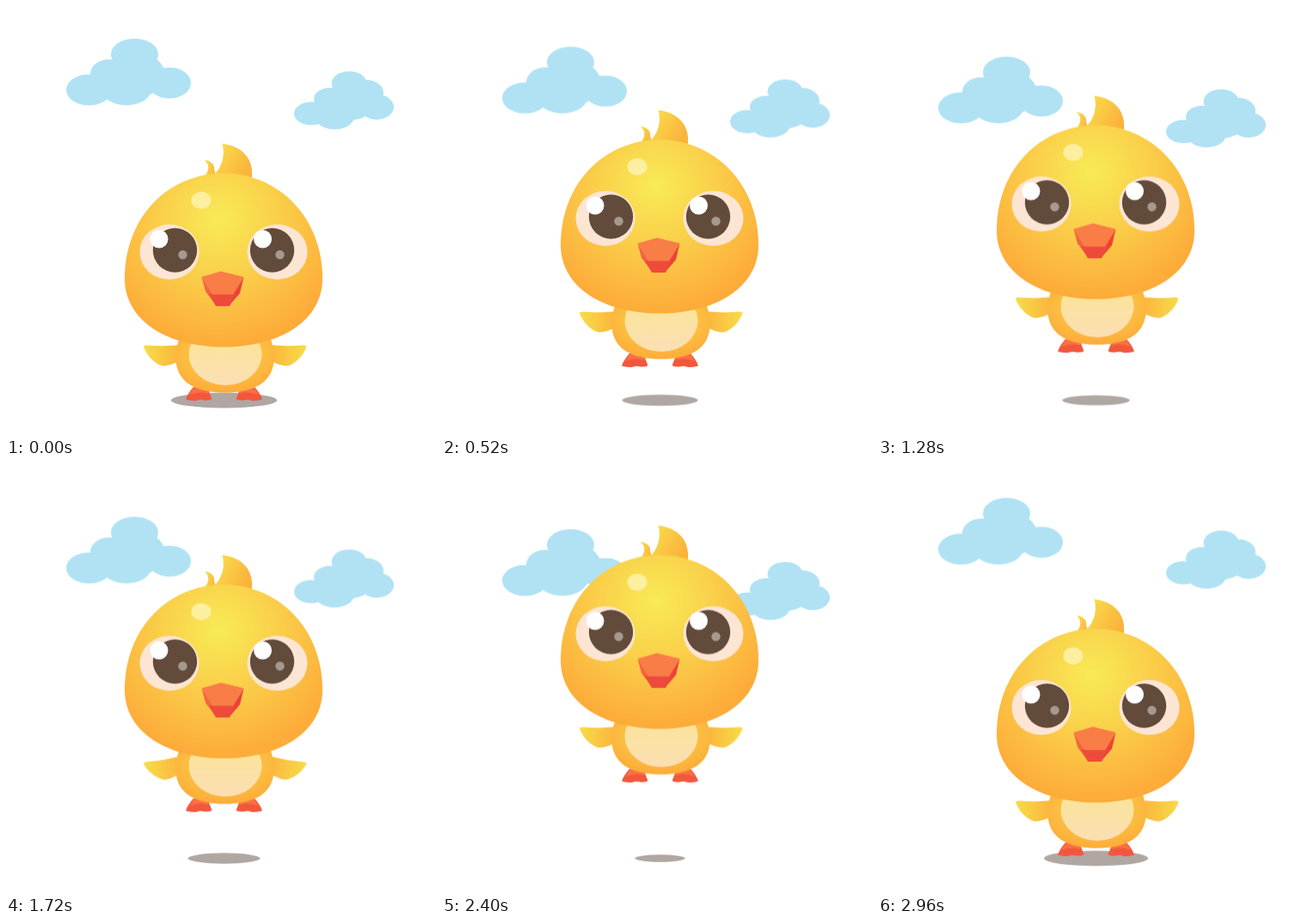
These frames come from a looping animation (500 px wide and 500 px high, 3000 ms). An HTML page:

```html
<!DOCTYPE html>
<html lang="en">
<head>
<meta charset="utf-8">
<title>Hopping chick</title>
<style>
  html, body { margin: 0; width: 100%; height: 100%; overflow: hidden; background: #fff; }
  svg { display: block; width: 100%; height: 100%; }

  /* Three rising hops, then one long fall */
  .clouds, .chick, .shadow, .wing {
    animation: 3s cubic-bezier(.37, 0, .63, 1) infinite;
  }
  .clouds { animation-name: drift; }
  .chick { animation-name: hop; }
  .shadow { animation-name: shrink; transform-origin: 253.5px 458.5px; }
  .wing { animation-name: flap; transform-origin: 203px 400px; }

  @keyframes hop {
    0%, 100% { transform: translateY(0); }
    12% { transform: translateY(-58.3px); }
    24% { transform: translateY(-12px); }
    36.333% { transform: translateY(-87px); }
    48.333% { transform: translateY(-30px); }
    71% { transform: translateY(-101px); animation-timing-function: cubic-bezier(.333, 0, .667, .333); }
    88% { transform: translateY(-57px); animation-timing-function: linear; }
    98.667% { transform: translateY(-3px); animation-timing-function: linear; }
  }
  @keyframes drift {
    0%, 100% { transform: translateY(0); }
    12% { transform: translateY(14px); }
    24% { transform: translateY(3px); }
    36.333% { transform: translateY(30.5px); }
    48.333% { transform: translateY(13px); }
    71% { transform: translateY(43.5px); animation-timing-function: cubic-bezier(.333, 0, .667, .333); }
    88% { transform: translateY(23.5px); animation-timing-function: linear; }
    98.667% { transform: translateY(1.5px); animation-timing-function: linear; }
  }
  @keyframes shrink {
    0%, 100% { transform: scale(1); }
    12% { transform: scale(.58); }
    24% { transform: scale(.91); }
    36.333% { transform: scale(.41); }
    48.333% { transform: scale(.83); }
    71% { transform: scale(.403); animation-timing-function: cubic-bezier(.333, 0, .667, .333); }
    88% { transform: scale(.65); animation-timing-function: linear; }
    98.667% { transform: scale(.985); animation-timing-function: linear; }
  }
  @keyframes flap {
    0%, 12%, 24%, 36.333%, 48.333%, 70.5%, 100% { transform: rotate(0deg); }
    6%, 30.167%, 58% { transform: rotate(-9deg); }
  }
</style>
</head>
<body>
<svg viewBox="0 0 500 500">
  <defs>
    <radialGradient id="skin" gradientUnits="userSpaceOnUse" cx="248" cy="248" r="148">
      <stop offset="0" stop-color="#f8eb57"/>
      <stop offset=".45" stop-color="#fad04a"/>
      <stop offset="1" stop-color="#fdab39"/>
    </radialGradient>
    <linearGradient id="tuft" x1="0" y1="0" x2="1" y2=".5">
      <stop offset=".2" stop-color="#f9dd4d"/>
      <stop offset="1" stop-color="#fbb33b"/>
    </linearGradient>
    <linearGradient id="feather">
      <stop offset="0" stop-color="#f7dc48"/>
      <stop offset="1" stop-color="#fcb13c"/>
    </linearGradient>
    <radialGradient id="trunk" cx=".5" cy=".35" r=".65">
      <stop offset="0" stop-color="#f9da4d"/>
      <stop offset="1" stop-color="#fdac39"/>
    </radialGradient>
    <linearGradient id="belly" x2="0" y2="1">
      <stop offset=".3" stop-color="#fbe49a"/>
      <stop offset="1" stop-color="#fbdfb4"/>
    </linearGradient>
    <path id="feathers" fill="url(#feather)"
      d="M160 396Q160 394 165 394.500C178 396 190 395 206 394L206 409C198 415 191 418.500 182 418.500C171 415 163 405 160 396Z"/>
    <g id="foot">
      <path fill="#f2573c" d="M218 443H234L239.500 457Q236 459 231 458.500Q226 457 221 459Q215 459 209 457.500Q211 451 218 443Z"/>
      <path fill="#fa7043" d="M219 443H233L236 451Q226 447 213 452Z"/>
    </g>
    <g id="pupil">
      <circle r="25.700" fill="#634b3b"/>
      <circle cx="9" cy="5.200" r="5.200" fill="#a6998f"/>
    </g>
  </defs>

  <g class="clouds" fill="#b0e2f4">
    <ellipse cx="149.500" cy="56" rx="27.500" ry="18"/>
    <ellipse cx="120" cy="79" rx="22" ry="17"/>
    <ellipse cx="150" cy="80" rx="35" ry="26"/>
    <ellipse cx="96.500" cy="97.500" rx="26.500" ry="18"/>
    <ellipse cx="140" cy="97" rx="29" ry="18.500"/>
    <ellipse cx="190" cy="89.500" rx="25" ry="18"/>
    <ellipse cx="399" cy="90" rx="20.500" ry="14"/>
    <ellipse cx="377" cy="108" rx="19" ry="13"/>
    <ellipse cx="420" cy="101" rx="19" ry="15"/>
    <ellipse cx="398" cy="113" rx="30" ry="20"/>
    <ellipse cx="355" cy="125" rx="20" ry="13.500"/>
    <ellipse cx="382" cy="128" rx="23" ry="15.500"/>
    <ellipse cx="431" cy="117.500" rx="20" ry="14.500"/>
  </g>

  <ellipse class="shadow" cx="253.500" cy="458.500" rx="61.500" ry="9" fill="#b0a7a2"/>

  <g class="chick">
    <use href="#foot"/>
    <use href="#foot" transform="translate(507) scale(-1 1)"/>
    <g class="wing"><use href="#feathers"/></g>
    <g transform="translate(509.500) scale(-1 1)">
      <g class="wing"><use href="#feathers"/></g>
    </g>
    <path fill="url(#trunk)" d="M204 380C191 410 192 449.500 254.500 449.500C317 449.500 318 410 305 380Z"/>
    <ellipse cx="255" cy="405" rx="42.500" ry="36" fill="url(#belly)"/>

    <path fill="url(#tuft)" d="M231 179C239 180 243 185 242 190L246 203H226C235 195 239 187 231 179Z"/>
    <path fill="url(#tuft)" d="M251.500 160C274 163 290 177 285.500 204H234C249 192 256 178 251.500 160Z"/>
    <path fill="url(#skin)" d="M253 194.500C316 194.500 368 245 368 317C368 366 318 396.500 253 396.500C188 396.500 138 366 138 317C138 245 189 194.500 253 194.500Z"/>
    <ellipse cx="227" cy="226" rx="11.500" ry="10" fill="#fcefa0"/>

    <g fill="#fde5d3">
      <ellipse cx="190" cy="286" rx="34.500" ry="32"/>
      <ellipse cx="315.500" cy="286" rx="35" ry="32"/>
    </g>
    <use href="#pupil" x="196.500" y="284"/>
    <use href="#pupil" x="309.500" y="284"/>
    <g fill="#fff">
      <circle cx="178" cy="271" r="10.500"/>
      <circle cx="298.500" cy="271" r="10.500"/>
    </g>

    <path fill="#f5643f" d="M227.500 315L241 336L245 349L232 332Z"/>
    <path fill="#ee4238" d="M276.500 315L264 335L259 349L272 334Z"/>
    <path fill="#ee4a3c" d="M236 335H266L260 349H244Z"/>
    <path fill="#f97d46" d="M227.500 315L250 308.500L276.500 315L264 335.500H240Z"/>
  </g>
</svg>
</body>
</html>
```
